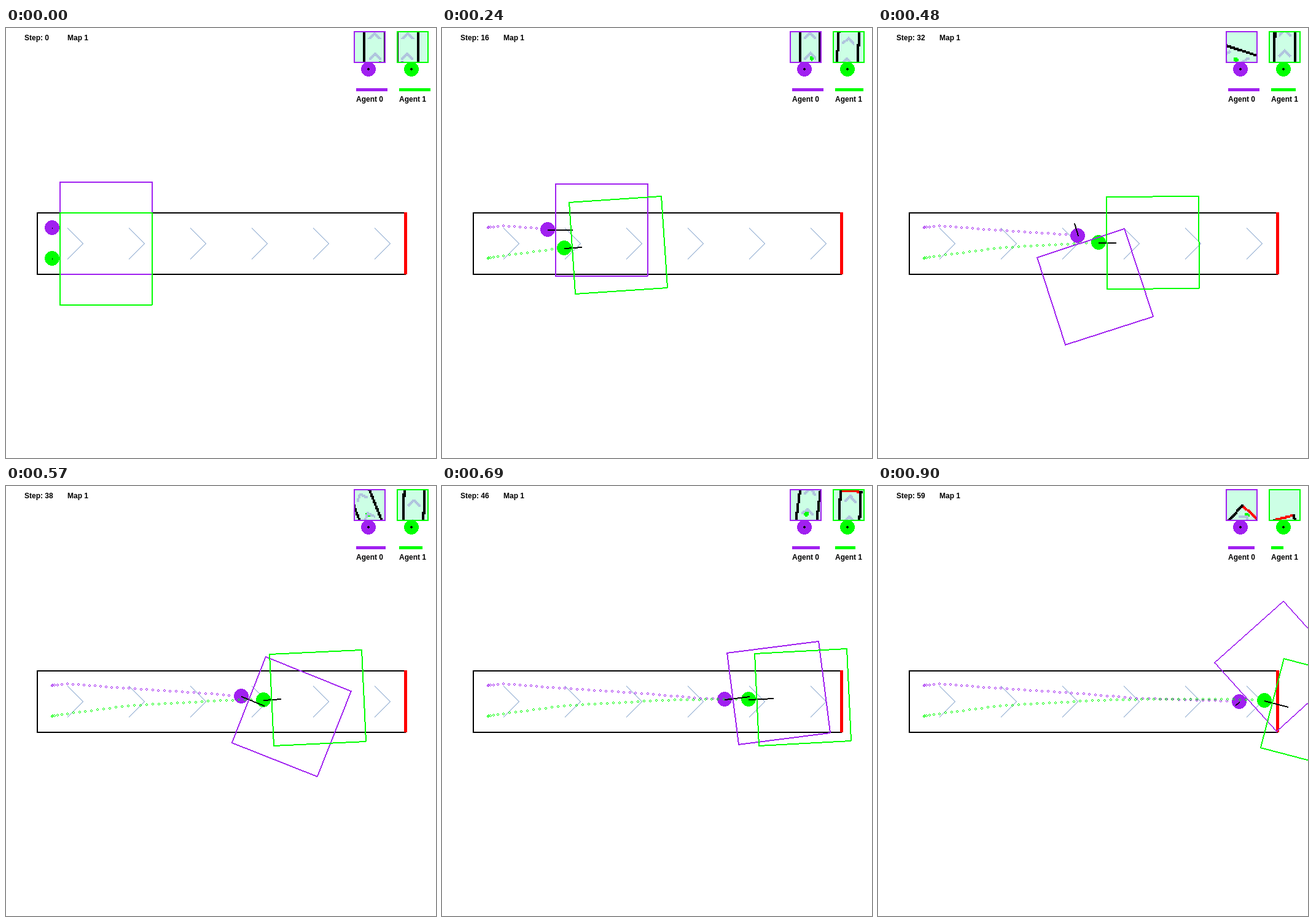
These frames come from a looping animation (700x700 px, 930 ms). An HTML page with a canvas:

```html
<!DOCTYPE html>
<html lang="en">
<head>
<meta charset="utf-8">
<title>Two agents running</title>
<style>
  html, body { margin: 0; width: 100%; height: 100%; overflow: hidden; background: #fff; }
  canvas { display: block; }
</style>
</head>
<body>
<canvas id="stage" width="700" height="700"></canvas>
<script>
const ctx = document.getElementById('stage').getContext('2d');
const FRAME_MS = 30, FRAMES = 31, LAST_STEP = 59;
const RADIUS = 12, VIEW = 150, CELL = 6, CELLS = VIEW / CELL;
const VIEW_START = 10.5, SIGHT = 6.3;
const FULL = 51;

// Map: [x0, y0, x1, y1, colour, width], most important for the views first
const segments = [
  [50, 300, 650, 300, '#000', 2],
  [50, 400, 650, 400, '#000', 2],
  [50, 300, 50, 400, '#000', 2],
  [650, 300, 650, 400, '#f00', 5],
];
for (let x = 100; x <= 600; x += 100) {
  segments.push([x, 325, x + 25, 350, '#b0c4de', 2], [x + 25, 350, x, 375, '#b0c4de', 2]);
}

// Key poses [step, x, y, heading in degrees]: the first leg accelerates, the rest is steady
const agents = [
  {
    color: '#a020f0', panelX: 567,
    keys: [[3, 75, 325, 0], [8, 100, 322.6, 36], [16, 172.2, 328, 0], [32, 325.4, 338, 72],
      [42, 421.6, 346, -12], [52, 519.6, 349, 0], [59, 588.4, 351, -42]],
    // Brakes in sharp turns
    force: (step, heading) => heading > 30 ? -20 : heading < -30 ? -8 : 40,
    energy: step => Math.min(FULL, Math.max(43, FULL - 0.45 * (step - 32))),
  },
  {
    color: '#0f0', panelX: 637,
    keys: [[1, 75, 375, 0], [6, 100.2, 371.2, -8], [16, 199.4, 358.2, -3.8], [32, 359.4, 349.2, -0.4],
      [42, 459.5, 347.3, -4.2], [52, 559.3, 347.4, -0.8], [59, 629.3, 349.2, 14.7]],
    // Cruises between the launch and the final sprint
    force: step => step < 6 || step > 44 ? 40 : 28,
    energy: step => FULL - step / 3 - 0.65 * Math.max(0, step - 42),
  },
];

function keyed(keys, step) {
  const i = Math.max(1, keys.findIndex(key => key[0] >= step));
  const a = keys[i - 1], b = keys[i];
  let k = Math.max(0, (step - a[0]) / (b[0] - a[0]));
  if (i === 1) k *= k;
  return a.slice(1).map((v, n) => v + (b[n + 1] - v) * k);
}

function pose(agent, step) {
  const [x, y, heading] = keyed(agent.keys, step);
  const cos = Math.cos(heading * Math.PI / 180), sin = Math.sin(heading * Math.PI / 180);
  const ahead = (forward, side) => [x + forward * cos - side * sin, y + forward * sin + side * cos];
  return { x, y, px: Math.floor(x), py: Math.floor(y), heading, ahead };
}

// Hard-edged line, thickened along its minor axis
function line(x0, y0, x1, y1, color, width) {
  [x0, y0, x1, y1] = [x0, y0, x1, y1].map(Math.round);
  const dx = x1 - x0, dy = y1 - y0, n = Math.max(Math.abs(dx), Math.abs(dy));
  const flat = Math.abs(dx) >= Math.abs(dy), shift = (width - 1) >> 1;
  ctx.fillStyle = color;
  for (let i = 0; i <= n; i++) {
    const x = Math.round(x0 + dx * i / (n || 1)), y = Math.round(y0 + dy * i / (n || 1));
    if (flat) ctx.fillRect(x, y - shift, 1, width);
    else ctx.fillRect(x - shift, y, width, 1);
  }
}

function disc(x, y, r, color) {
  ctx.fillStyle = color;
  for (let row = -r; row < r; row++) {
    const half = Math.round(Math.sqrt(r * r - (row + 0.5) ** 2));
    ctx.fillRect(x - half, y + row, half * 2, 1);
  }
}

function ring(x, y, color) {
  ctx.fillStyle = color;
  for (const d of [-2, 1]) {
    ctx.fillRect(x - 1, y + d, 2, 1);
    ctx.fillRect(x + d, y - 1, 1, 2);
  }
}

function text(str, x, y) {
  ctx.fillStyle = '#000';
  ctx.fillText(str, x, y);
}

function distance(px, py, [x0, y0, x1, y1]) {
  const dx = x1 - x0, dy = y1 - y0;
  const k = ((px - x0) * dx + (py - y0) * dy) / (dx * dx + dy * dy);
  const c = Math.min(1, Math.max(0, k));
  return Math.hypot(px - x0 - c * dx, py - y0 - c * dy);
}

function drawField({ ahead }, color) {
  const near = RADIUS, far = RADIUS + VIEW, half = VIEW / 2;
  const corners = [ahead(near, -half), ahead(far, -half), ahead(far, half), ahead(near, half)];
  corners.forEach((c, i) => line(...c, ...corners[(i + 1) % 4], color, 2));
}

// What the agent sees, forward pointing up
function drawView(agent, { ahead }, other, otherColor) {
  const left = agent.panelX, top = 6;
  ctx.fillStyle = '#ccffe5';
  ctx.fillRect(left, top, 50, 50);
  for (let row = 0; row < CELLS; row++) {
    for (let col = 0; col < CELLS; col++) {
      const [x, y] = ahead(VIEW_START + (CELLS - 1 - row) * CELL, (col - (CELLS - 1) / 2) * CELL);
      const hit = segments.find(s => distance(x, y, s) <= SIGHT);
      const color = hit ? hit[4] : Math.hypot(x - other.x, y - other.y) <= RADIUS && otherColor;
      if (!color) continue;
      ctx.fillStyle = color;
      ctx.fillRect(left + col * 2, top + row * 2, 2, 2);
    }
  }
  ctx.strokeStyle = agent.color;
  ctx.lineWidth = 2;
  ctx.strokeRect(left, top, 50, 50);
  disc(left + 23, 67, RADIUS, agent.color);
  disc(left + 23, 67, 2, '#000');
}

function draw(step) {
  const poses = agents.map(agent => pose(agent, step));
  ctx.fillStyle = '#fff';
  ctx.fillRect(0, 0, 700, 700);
  segments.forEach(s => line(...s));

  agents.forEach((agent, i) => disc(poses[i].px, poses[i].py, RADIUS, agent.color));
  for (const agent of agents) {
    for (let s = 0; s <= step; s++) {
      const { px, py } = pose(agent, s);
      ring(px, py, agent.color);
    }
  }
  agents.forEach((agent, i) => {
    const { px, py, heading, ahead } = poses[i];
    const force = step && agent.force(step, heading);
    line(px, py, ...ahead(force, 0).map(Math.floor), '#000', 2);
  });
  agents.forEach((agent, i) => drawField(poses[i], agent.color));

  ctx.font = 'bold 12px "Liberation Sans", Arial, sans-serif';
  text('Step: ' + step, 30, 20);
  text('Map 1', 100, 20);
  agents.forEach((agent, i) => {
    drawView(agent, poses[i], poses[1 - i], agents[1 - i].color);
    ctx.fillStyle = agent.color;
    ctx.fillRect(agent.panelX + 3, 98, Math.round(agent.energy(step)), 5);
    text('Agent ' + i, agent.panelX + 3, 120);
  });
}

let shown = -1;
function tick() {
  const frame = Math.floor(performance.now() / FRAME_MS) % FRAMES;
  if (frame !== shown) draw(Math.min(frame * 2, LAST_STEP));
  shown = frame;
  requestAnimationFrame(tick);
}
tick();
</script>
</body>
</html>
```
